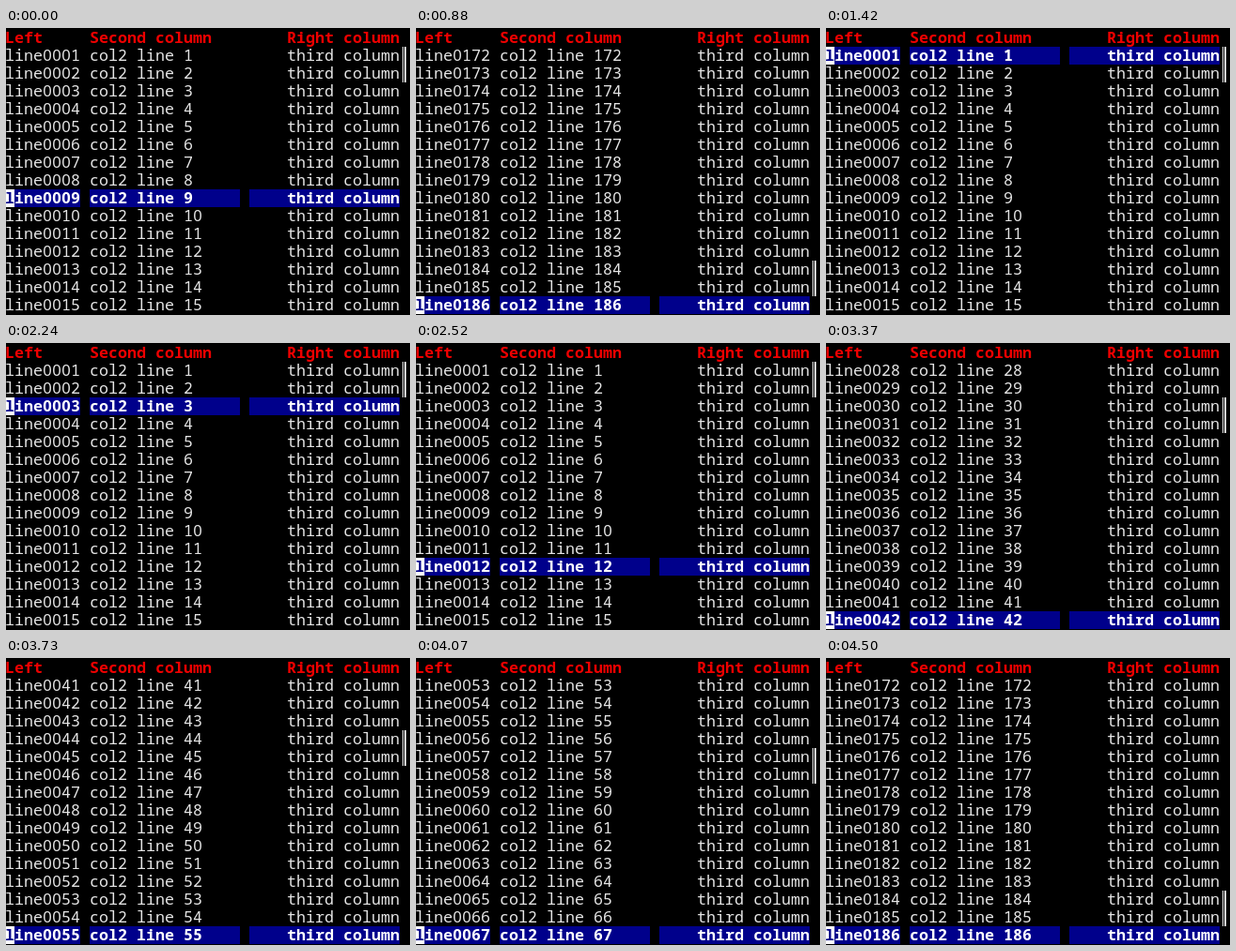
These frames come from a looping animation (430 by 306 pixels, 4.62 s). An HTML page with a canvas:

```html
<!DOCTYPE html>
<html lang="en">
<head>
<meta charset="utf-8">
<title>Scrolling table</title>
<style>
html, body { margin: 0; width: 100%; height: 100%; overflow: hidden; background: #000; }
canvas { display: block; }
</style>
</head>
<body>
<canvas id="stage" width="430" height="306"></canvas>
<script>
const ctx = document.getElementById('stage').getContext('2d');
const LOOP = 4620, TICK = 40;
const TOTAL = 200, ROWS = 15, BAR_ROWS = 2;
const CELL = 10, ROW = 19, LEFT = -1, TOP = 1, BASELINE = 15;
const COLUMNS = [[0, 8], [9, 16], [26, 16]]; // first cell, width in cells
const TEXT = '#e5e5e5', WHITE = '#fff', RED = '#ee0000', NAVY = '#00008b';

// Start time, selected line, and the line reached at the next key when scrolling.
const KEYS = [
  [0, 9], [40, 1], [310, 200], [880, 186], [1420, 1], [1750, 2],
  [2240, 3, 26], [2930, 26, 42], [3370, 42, 61], [3900, 61, 67], [4070, 67, 73],
  [4230, 200], [4500, 186], [LOOP, 9]
];

function selectedAt(time) {
  const next = KEYS.findIndex(key => key[0] > time);
  const [start, from, to = from] = KEYS[next - 1];
  const ticks = Math.max(1, Math.floor((KEYS[next][0] - start) / TICK));
  const tick = Math.min(ticks - 1, Math.floor((time - start) / TICK));
  return Math.floor(from + (to - from) * tick / ticks);
}

const cellX = col => LEFT + col * CELL;
const rowY = row => TOP + row * ROW;

function fillCells(col, row, width, color) {
  ctx.fillStyle = color;
  ctx.fillRect(cellX(col), rowY(row), width * CELL, ROW);
}

function write(text, col, row, color, weight = 'normal') {
  ctx.fillStyle = color;
  [...text].forEach((char, i) => {
    // The proportional face has a plain zero, without a slash.
    const family = char === '0' ? '"Noto Sans", sans-serif' : '"Noto Sans Mono", monospace';
    ctx.font = `${weight} 16.667px ${family}`;
    ctx.fillText(char, cellX(col + i) + CELL / 2, rowY(row) + BASELINE);
  });
}

function drawLine(line, row, selected) {
  const color = selected ? WHITE : TEXT;
  const weight = selected ? 'bold' : 'normal';
  const name = 'line' + String(line).padStart(4, '0');
  if (selected) {
    COLUMNS.forEach(([col, width]) => fillCells(col, row, width, NAVY));
    fillCells(0, row, 1, WHITE);
  }
  write(name[0], 0, row, selected ? NAVY : color, weight);
  write(name.slice(1), 1, row, color, weight);
  write('col2 line ' + line, 9, row, color, weight);
  write('third column', 30, row, color, weight);
}

function drawScrollbar(top) {
  const offset = Math.round((ROWS - BAR_ROWS) * (top - 1) / (TOTAL - ROWS));
  const y = rowY(1 + offset);
  ctx.fillStyle = TEXT;
  ctx.fillRect(422, y, 1, BAR_ROWS * ROW);
  ctx.fillRect(424, y, 2, BAR_ROWS * ROW);
}

function draw(time) {
  const selected = selectedAt(time);
  const top = Math.max(1, selected - ROWS + 1);
  ctx.fillStyle = '#000';
  ctx.fillRect(0, 0, 430, 306);
  ctx.textAlign = 'center';
  write('Left', 0, 0, RED, 'bold');
  write('Second column', 9, 0, RED, 'bold');
  write('Right column', 30, 0, RED, 'bold');
  for (let i = 0; i < ROWS; i++) drawLine(top + i, i + 1, top + i === selected);
  drawScrollbar(top);
}

const start = performance.now();
function frame() {
  draw((performance.now() - start) % LOOP);
  requestAnimationFrame(frame);
}
frame();
</script>
</body>
</html>
```
